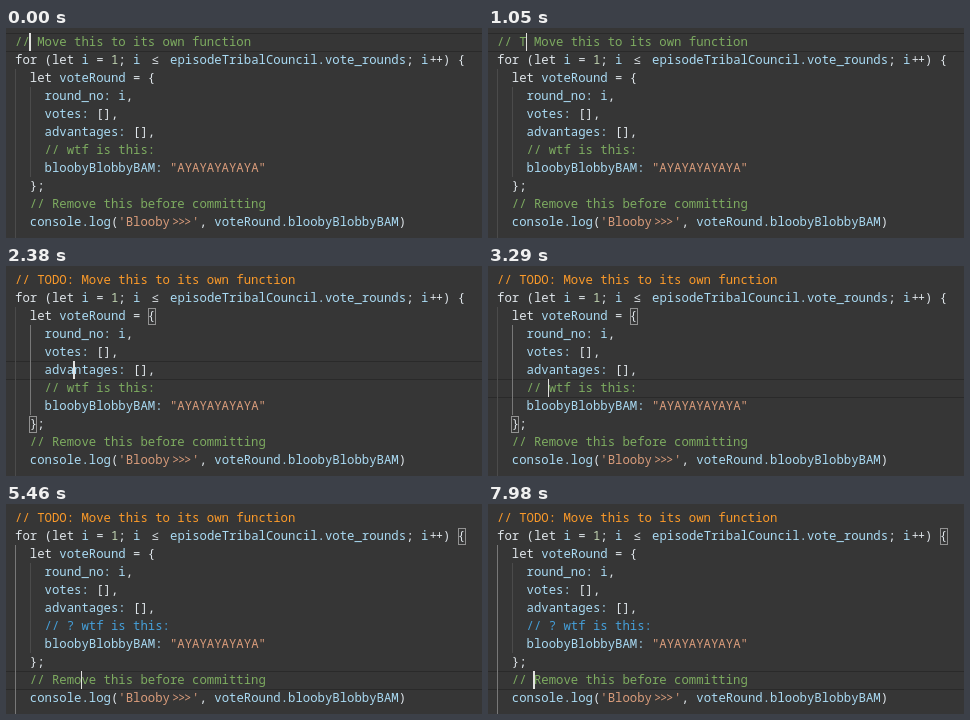
Write an HTML page that moves like this. It is 476 px wide and 210 px high and loops after 8 s.

```html
<!DOCTYPE html>
<html lang="en">
<head>
<meta charset="utf-8">
<title>Editor comments</title>
<style>
  html, body { margin: 0; width: 100%; height: 100%; overflow: hidden; background: #363636; }
  #stage {
    --w: 7.38px;
    position: relative; width: 476px; height: 210px; overflow: hidden; background: #363636;
    font: 500 12.3px/18px "Noto Sans Mono", "DejaVu Sans Mono", monospace;
    color: #dfe5ea;
  }
  #stage > * { position: absolute; box-sizing: border-box; }
  .line { left: 9px; height: 18px; white-space: pre; }
  .com { color: #7dab60; }
  .todo { color: #fb9a2a; }
  .ask { color: #459fd9; }
  .id { color: #a9daf3; }
  .str { color: #d99c7b; }
  .num { color: #c3d6b4; }
  .wide { display: inline-block; width: calc(2 * var(--w)); text-align: center; }
  .tight { display: inline-block; letter-spacing: -1.1px; padding: 0 .55px 0 .55px; }
  .plus { display: inline-block; width: calc(2 * var(--w)); text-align: center; letter-spacing: -1.1px; }
  .arrows { display: inline-block; width: calc(3 * var(--w)); text-align: center; letter-spacing: -1.3px; }
  .guide { width: 1px; background: #4b4b4b; }
  .guide.on { background: #787878; }
  #row { left: 0; width: 476px; height: 19px; border: solid #2a2a2a; border-width: 1px 0; }
  #caret { width: 1.5px; height: 18px; background: #e2e2e0; }
  .box { width: 8px; height: 17px; border: 1px solid #929292; }
</style>
</head>
<body>
<div id="stage">
  <div id="row"></div>
  <div class="guide" id="outer" style="left:9px;top:41px;height:169px"></div>
  <div class="guide" id="inner" style="left:24px;top:59px;height:90px"></div>
</div>
<script>
const LOOP = 8000, CELL = 7.38, LEFT = 9, TOP = 5, PITCH = 18;
const stage = document.getElementById('stage');
const $ = id => document.getElementById(id);

const span = (cls, text) => `<span class="${cls}">${text}</span>`;
const id = text => span('id', text);
const str = text => span('str', text);

const code = [
  '',
  `for (let ${id('i')} = ${span('num', '1')}; ${id('i')} ${span('wide', '≤')} ` +
    `${id('episodeTribalCouncil.vote_rounds')}; ${id('i')}${span('plus', '++')}) {`,
  `  let ${id('voteRound')} = {`,
  `    ${id('round_no: i')},`,
  `    ${id('votes:')} [],`,
  `    ${id('advantages:')} [],`,
  '',
  `    ${id('bloobyBlobbyBAM:')} ${str('"AYAYAYAYAYA"')}`,
  '  };',
  `  ${span('com', '// Remove this before committing')}`,
  `  ${id('console.log')}(${str("'Blooby" + span('arrows', '&gt;&gt;&gt;') + "'")}, ` +
    `${id('voteRound.bloobyBlobbyBAM')})`
];

function add(cls, html = '') {
  const el = document.createElement('div');
  el.className = cls;
  el.innerHTML = html;
  return stage.appendChild(el);
}

function place(el, line, col, dx = 0, dy = 0) {
  el.style.left = LEFT + col * CELL + dx + 'px';
  el.style.top = TOP + line * PITCH + dy + 'px';
}

const lines = code.map((html, i) => {
  const el = add('line', html);
  el.style.top = TOP + i * PITCH - 0.5 + 'px';
  return el;
});
const boxes = [add('box'), add('box')];
const caret = add('');
caret.id = 'caret';

// time, line, column of the caret
const moves = [
  [0, 0, 2], [420, 0, 3],
  [980, 0, 4], [1120, 0, 5], [1260, 0, 6], [1400, 0, 7], [1540, 0, 8],
  [1820, 1, 8], [1960, 2, 8], [2100, 3, 8], [2240, 4, 8], [2380, 5, 8], [2590, 6, 8],
  [2940, 6, 7], [3640, 6, 8], [3850, 6, 9],
  [4480, 7, 9], [4690, 8, 4], [4900, 9, 9],
  [5810, 9, 8], [7070, 9, 7], [7280, 9, 6], [7490, 9, 5]
];

// bracket cells to outline for a caret line
function brackets(line) {
  if (line === 0) return [];
  if (line === 1) return [[1, 4], [1, 58]];
  if (line > 2 && line < 8) return [[2, 18], [8, 2]];
  return [[1, 60]];
}

let shown = -1;
function draw(t) {
  let step = moves.length - 1;
  while (moves[step][0] > t) step--;
  if (step === shown) return;
  shown = step;
  const [at, line, col] = moves[step];

  const todo = ' TODO:'.slice(0, line ? 6 : col - 2);
  lines[0].innerHTML = span(todo.includes('TODO') ? 'todo' : 'com',
    `//${todo} Move this to its own function`);
  const ask = at < 3640 ? '' : at < 3850 ? '?' : '? ';
  lines[6].innerHTML = '    ' + span(ask ? 'ask' : 'com', `// ${ask}wtf is this:`);

  place(caret, line, col, -0.7);
  $('row').style.top = TOP + line * PITCH - 0.5 + 'px';
  const cells = brackets(line);
  boxes.forEach((box, i) => {
    box.hidden = !cells[i];
    box.style.display = cells[i] ? '' : 'none';
    if (cells[i]) place(box, ...cells[i], -0.3, 0.5);
  });
  $('outer').classList.toggle('on', line === 1 || line === 9);
  $('inner').classList.toggle('on', line > 1 && line < 9);
}

const start = performance.now();
function tick(now) {
  draw(Math.max(0, now - start) % LOOP);
  requestAnimationFrame(tick);
}
draw(0);
requestAnimationFrame(tick);
</script>
</body>
</html>
```
